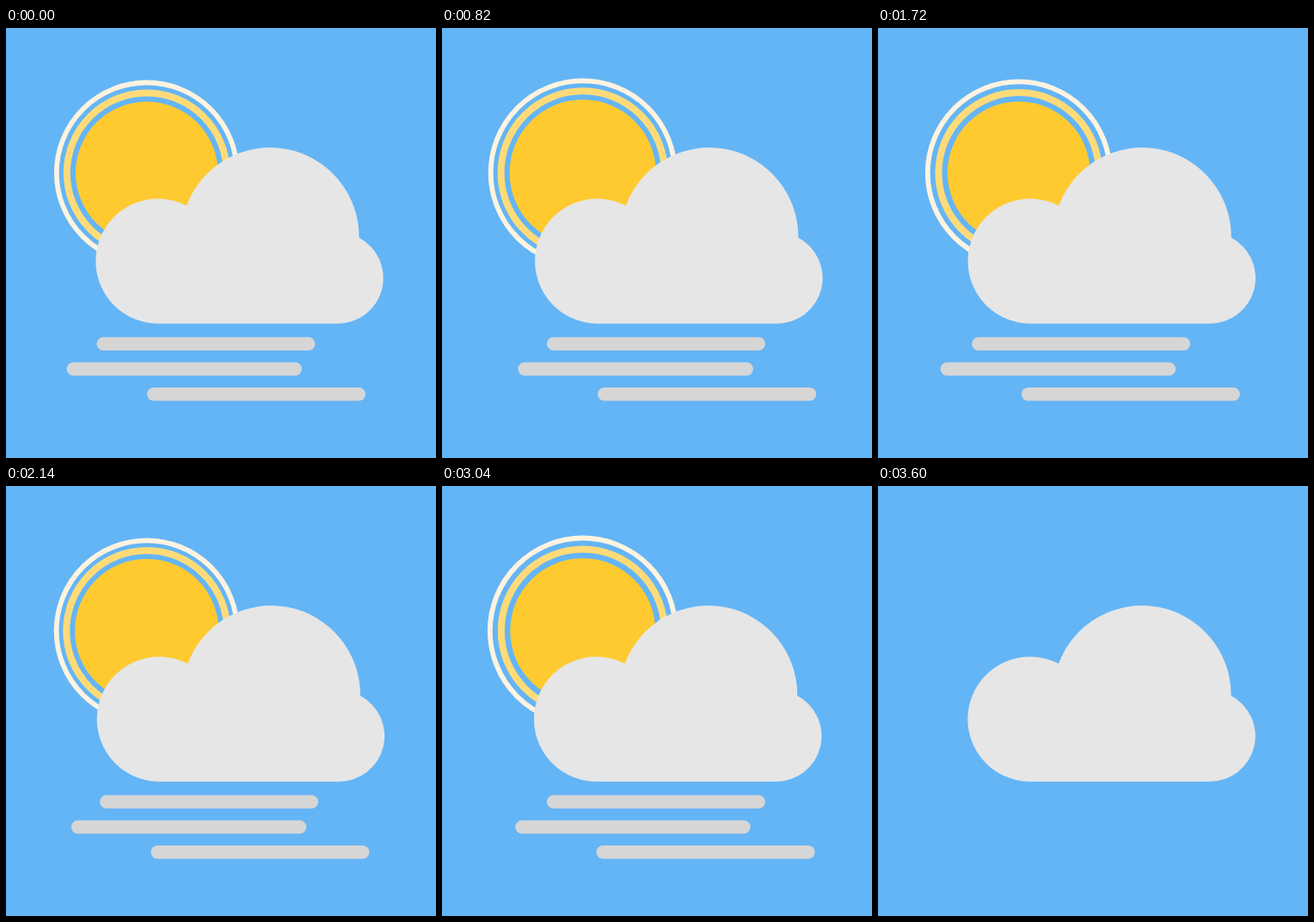
Recreate the animation shown at these times as an HTML page. Size 500 px wide and 500 px high, loop 3.62 s.

```html
<!DOCTYPE html>
<html lang="en">
<head>
<meta charset="utf-8">
<title>Sun and cloud</title>
<style>
  html, body { margin: 0; width: 100%; height: 100%; overflow: hidden; background: #64b5f6; }
  svg { display: block; width: 100vw; height: 100vh; }
</style>
</head>
<body>
<svg viewBox="0 0 500 500">
  <rect width="500" height="500" fill="#64b5f6"/>
  <g id="sun" fill="none">
    <circle id="outer" cx="163.7" cy="168.4" stroke="#fff3e0" stroke-width="5.8"/>
    <circle id="inner" cx="163.7" cy="168.4" stroke="#ffdb78" stroke-width="8"/>
    <circle id="disc" cx="163.7" cy="168.4" fill="#ffca30"/>
  </g>
  <path id="cloud" fill="#e6e6e6" d="M176.5 343.7A72.6 72.6 0 1 1 210 206.5A103.5 103.5 0 0 1 410.5 243.8A53 53 0 0 1 385.8 343.7Z"/>
  <g id="wind" fill="#d6d6d6">
    <rect id="top" x="105.5" y="359.5" width="254" height="15.6" rx="7.8"/>
    <rect id="mid" x="70.5" y="388.7" width="273.5" height="15.6" rx="7.8"/>
    <rect id="low" x="164" y="418" width="254" height="15.6" rx="7.8"/>
  </g>
</svg>
<script>
  const LOOP = 3620, END = 3600, HALF = 900, STEP = 20;
  const el = id => document.getElementById(id);

  // Soft back-and-forth between 0 and 1, resting until the delay has passed.
  function swing(t, delay) {
    const u = Math.max(0, t - delay) / HALF % 2;
    const p = u > 1 ? 2 - u : u;
    return (p + (1 - Math.cos(Math.PI * p)) / 2) / 2;
  }

  // id, base radius, growth, delay
  const rings = [
    ["disc", 82.8, 2.5, 0],
    ["inner", 92.9, 2.6, 100],
    ["outer", 104.9, 3.2, 250]
  ].map(([id, r, grow, delay]) => ({ node: el(id), r, grow, delay }));

  // id, travel, delay
  const sliders = [
    ["cloud", 4, 0],
    ["mid", 20, 60],
    ["low", 20, 95],
    ["top", 20, 130]
  ].map(([id, travel, delay]) => ({ node: el(id), travel, delay }));

  const groups = [el("sun"), el("wind")];

  function draw(ms) {
    const t = Math.floor(ms % LOOP / STEP) * STEP;
    for (const g of groups) g.setAttribute("visibility", t < END ? "visible" : "hidden");
    for (const c of rings) c.node.setAttribute("r", c.r + c.grow * swing(t, c.delay));
    for (const s of sliders) {
      s.node.setAttribute("transform", `translate(${s.travel * swing(t, s.delay)} 0)`);
    }
  }

  let start = null;
  function tick(now) {
    if (start === null) start = now;
    draw(now - start);
    requestAnimationFrame(tick);
  }
  draw(0);
  requestAnimationFrame(tick);
</script>
</body>
</html>
```
